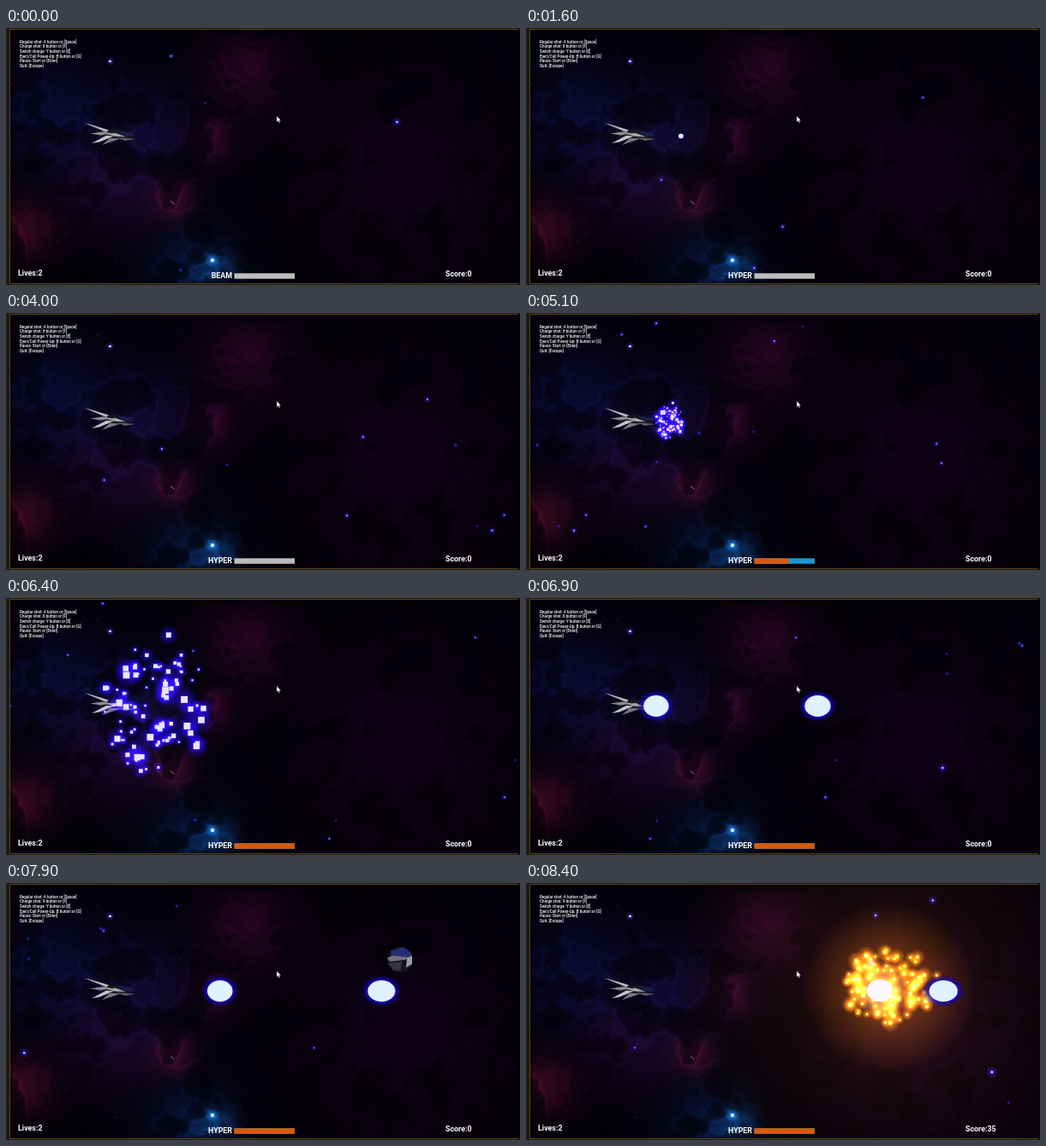
Write an HTML page with a canvas that moves like this. It is 600 by 301 pixels and loops after 8500 ms.

```html
<!DOCTYPE html>
<html lang="en">
<head>
<meta charset="utf-8">
<title>Space shooter</title>
<style>
html, body { margin: 0; width: 100%; height: 100%; overflow: hidden; background: #030108; }
#stage { position: relative; width: 600px; height: 301px; overflow: hidden; }
canvas, svg { position: absolute; left: 0; top: 0; width: 600px; height: 301px; display: block; }
text { fill: #fff; font-family: Roboto, Arial, sans-serif; }
.help { font-size: 4.53px; font-weight: 500; }
.hud { font-size: 8.85px; font-weight: 700; }
</style>
</head>
<body>
<div id="stage">
<canvas id="view" width="600" height="301"></canvas>
<svg viewBox="0 0 600 301">
  <g class="help">
    <text x="16" y="17.8">Regular shot: A button or [Space]</text>
    <text x="16" y="23.4">Charge shot: X button or [F]</text>
    <text x="16" y="29">Switch charge: Y button or [E]</text>
    <text x="16" y="34.6">Eject/Call Power-Up: B button or [G]</text>
    <text x="16" y="40.1">Pause: Start or [Enter]</text>
    <text x="16" y="45.6">Quit: [Escape]</text>
  </g>
  <g class="hud">
    <text x="14" y="290">Lives:2</text>
    <text id="mode" x="264" y="293" text-anchor="end">BEAM</text>
    <text id="score" x="513" y="291">Score:0</text>
  </g>
  <path d="M316 103v7.2l1.6-1.4 1.2 2.4 1.1-.5-1.1-2.3h2.2z" fill="#fff" stroke="#222" stroke-width=".4"/>
</svg>
</div>
<script>
const W = 600, H = 301, LOOP = 8500, STEP = 100, TAU = Math.PI * 2;
const ctx = document.getElementById('view').getContext('2d');
const modeText = document.getElementById('mode');
const scoreText = document.getElementById('score');

// Event times in seconds
const T = { hyper: 0.9, shot: 1.535, charge: 4.3, full: 5.7, fire: 6.499, enemy: 6.9, hit: 8.2 };
const SHOT_SPEED = 475, STAR_SPEED = 465;

const clamp = (v, lo = 0, hi = 1) => Math.max(lo, Math.min(hi, v));

function seeded(seed) {
  return () => {
    seed = (seed * 1664525 + 1013904223) >>> 0;
    return seed / 4294967296;
  };
}

function scatter(count, seed, make) {
  const rnd = seeded(seed);
  return Array.from({ length: count }, () => make(rnd));
}

// Random point in an ellipse, evenly spread
function inEllipse(rnd, rx, ry) {
  const a = rnd() * TAU, r = Math.sqrt(rnd());
  return { x: rx * r * Math.cos(a), y: ry * r * Math.sin(a) };
}

function glow(c, x, y, r, rgb, alpha) {
  const g = c.createRadialGradient(x, y, 0, x, y, r);
  g.addColorStop(0, `rgba(${rgb},${alpha})`);
  g.addColorStop(0.45, `rgba(${rgb},${alpha * 0.4})`);
  g.addColorStop(1, `rgba(${rgb},0)`);
  c.fillStyle = g;
  c.fillRect(x - r, y - r, r * 2, r * 2);
}

function oval(c, color, x, y, rx, ry = rx) {
  c.fillStyle = color;
  c.beginPath();
  c.ellipse(x, y, rx, ry, 0, 0, TAU);
  c.fill();
}

function square(color, x, y, side) {
  ctx.fillStyle = color;
  ctx.fillRect(x - side / 2, y - side / 2, side, side);
}

function shape(c, color, path) {
  c.fillStyle = color;
  c.fill(new Path2D(path));
}

// Nebula: soft colour clouds shaped by fractal noise
function hash(x, y) {
  const s = Math.sin(x * 127.1 + y * 311.7) * 43758.5453;
  return s - Math.floor(s);
}

function noise(x, y) {
  const ix = Math.floor(x), iy = Math.floor(y);
  let u = x - ix, v = y - iy;
  u *= u * (3 - 2 * u);
  v *= v * (3 - 2 * v);
  const a = hash(ix, iy), b = hash(ix + 1, iy);
  const c = hash(ix, iy + 1), d = hash(ix + 1, iy + 1);
  return a + (b - a) * u + (c - a) * v + (a - b - c + d) * u * v;
}

function fbm(x, y) {
  let sum = 0;
  for (let i = 0, amp = 0.52, f = 1 / 32; i < 5; i++, amp /= 2, f *= 2.03)
    sum += amp * noise(x * f + i * 17, y * f + i * 31);
  return sum;
}

const cloud = (x, y, r, ...rgb) => ({ x, y, r, rgb });
const clouds = [
  cloud(50, 100, 62, 12, 16, 66),
  cloud(160, 122, 62, 14, 13, 56),
  cloud(125, 185, 60, 30, 8, 40),
  cloud(20, 238, 34, 84, 15, 36),
  cloud(194, 200, 24, 84, 15, 42),
  cloud(238, 130, 26, 64, 9, 42),
  cloud(280, 50, 48, 50, 7, 34),
  cloud(460, 170, 135, 19, 2, 22),
  cloud(215, 285, 50, 6, 28, 68),
  cloud(243, 286, 24, 8, 58, 100)
];

function paintNebula(c) {
  const img = c.createImageData(W, H);
  for (let y = 0, i = 0; y < H; y++) {
    for (let x = 0; x < W; x++, i += 4) {
      const n = fbm(x, y);
      const wisp = (1 - Math.min(1, Math.abs(n - 0.5) * 8)) ** 2;
      const k = 0.18 + clamp((n - 0.27) * 2) * 0.5 + wisp * 0.4;
      const px = [2, 0, 7];
      for (const { x: cx, y: cy, r, rgb } of clouds) {
        const w = Math.exp(-((x - cx) ** 2 + (y - cy) ** 2) / (r * r)) * k;
        rgb.forEach((v, j) => { px[j] += v * w; });
      }
      img.data.set([...px, 255], i);
    }
  }
  c.putImageData(img, 0, 0);
}

function paintShip(c) {
  shape(c, '#17171d', 'M104 121L132 119 150 125 141 131 112 130Z');
  shape(c, '#b4b4b8', 'M92 111.5L97 112.5 120 119.5 117 122Z');
  shape(c, '#8d8d94', 'M98 123.5L114 121.5 124 123.5 110 125.5Z');
  shape(c, '#c4c4c8', 'M100 135L117 126 126 126.5 109 133.5Z');
  shape(c, '#77777f', 'M112 137L121 129 134 129.5Z');
  shape(c, '#62626a', 'M130 128.5L151 130 139 132Z');
  shape(c, '#171e4c', 'M130 120.5L147 122.5 151 126 137 126Z');
  shape(c, '#a5a5ac', 'M117 124L128 123 140 127.5 128 127Z');
}

function paintFrame(c) {
  c.fillStyle = '#1c1a15';
  c.fillRect(0, 0, 4, H);
  c.fillRect(0, 0, W, 1);
  c.fillRect(0, 300, W, 1);
  c.fillStyle = '#54431a';
  c.fillRect(4, 1, 594, 1);
  c.fillRect(4, 299, 594, 1);
  c.fillRect(4, 1, 1, 298);
}

function makeBackdrop() {
  const canvas = document.createElement('canvas');
  canvas.width = W;
  canvas.height = H;
  const c = canvas.getContext('2d');
  paintNebula(c);
  scatter(130, 12, rnd => {
    const s = 0.5 + rnd() * 0.6;
    c.fillStyle = `rgba(90,105,210,${0.15 + rnd() * 0.45})`;
    c.fillRect(5 + 310 * rnd() ** 1.4, 4 + rnd() * 294, s, s);
  });
  c.globalCompositeOperation = 'lighter';
  glow(c, 121.5, 39, 5, '80,70,230', 0.9);
  oval(c, '#b9b4ff', 121.5, 39, 1.6, 1.1);
  glow(c, 241, 272, 9, '40,130,220', 0.8);
  oval(c, '#b5e6fa', 241, 272, 2);
  c.globalCompositeOperation = 'source-over';
  c.strokeStyle = '#c97a9b';
  c.lineWidth = 0.9;
  c.stroke(new Path2D('M192 202.5L196.5 206.5'));
  return canvas;
}

const stars = scatter(58, 77, rnd => ({
  enter: -1.3 + rnd() * 9.8,
  y: 5 + rnd() * 291,
  size: 0.8 + 1.2 * rnd() + 1.6 * rnd() ** 12
}));

function drawStars(t) {
  for (const { enter, y, size } of stars) {
    const x = W - STAR_SPEED * (t - enter);
    if (x < 4 || x > 598) continue;
    glow(ctx, x, y, size * 2.3, '50,35,255', 0.95);
    square(size > 1.35 ? '#c5c0ff' : '#4b43c8', x, y, size * 0.85);
  }
}

const sparks = scatter(88, 5, rnd => ({ ...inEllipse(rnd, 60, 86), size: 2 + 6 * rnd() ** 1.3 }));

// The spark cloud swells as the shot charges
function drawCharge(t) {
  if (t < T.charge || t >= T.fire) return;
  const spread = ((t - T.charge) / 2.1) ** 1.4;
  const grow = 0.25 + 0.75 * spread;
  const placed = sparks.map(s => ({
    x: 165 + (9 + s.x) * spread,
    y: 127 + (s.y - 2) * spread,
    side: Math.max(1, s.size * grow)
  }));
  ctx.globalCompositeOperation = 'lighter';
  for (const { x, y, side } of placed) glow(ctx, x, y, side * 1.9 + 1, '35,8,255', 0.9);
  ctx.globalCompositeOperation = 'source-over';
  for (const { x, y, side } of placed) square('#ece4ff', x, y, side);
}

function drawBall(x, y, rx, ry) {
  const g = ctx.createRadialGradient(0, 0, 0.8, 0, 0, 1.45);
  g.addColorStop(0, 'rgba(40,20,255,1)');
  g.addColorStop(0.4, 'rgba(22,8,190,.7)');
  g.addColorStop(1, 'rgba(10,0,120,0)');
  ctx.save();
  ctx.translate(x, y);
  ctx.scale(rx, ry);
  oval(ctx, g, 0, 0, 1.45);
  ctx.restore();
  oval(ctx, '#e0f2ff', x, y, rx * 0.95, ry * 0.95);
}

function drawShots(t) {
  const shotX = 150 + SHOT_SPEED * (t - T.shot);
  if (t >= T.shot && shotX < 605) drawBall(shotX, 126.5, 3, 3);
  for (let i = 0; i < 4; i++) {
    const age = t - T.fire - i * 0.397;
    const x = 150 + SHOT_SPEED * age;
    if (age < 0 || x > 625) continue;
    drawBall(x, 126.5, 15.5 + 3.5 * clamp((x - 201) / 377) ** 2, 13.2);
  }
}

function drawEnemy(t) {
  if (t < T.enemy || t >= T.hit) return;
  const age = t - 7.4;
  ctx.save();
  ctx.translate(527 - 134 * age, 32 + 116 * age);
  oval(ctx, '#14141f', 0, 0, 15);
  shape(ctx, '#262c72', 'M-11-11L4-15 14-7 11-2-10-4Z');
  shape(ctx, '#707080', 'M-15-2L-9-5 10-3 6 0-12 2Z');
  shape(ctx, '#34343f', 'M-14 4L2 2 1 13-8 12Z');
  shape(ctx, '#9a9aa6', 'M8-2L14-5 14 5 7 9Z');
  ctx.restore();
}

const embers = scatter(100, 41, rnd => ({ ...inEllipse(rnd, 57, 43), size: 2 + rnd() * 3 }));

function drawBlast(t) {
  if (t < T.hit) return;
  const k = 0.4 + 3 * (t - T.hit);
  ctx.globalCompositeOperation = 'lighter';
  glow(ctx, 424, 123, 260 * k, '80,36,8', 0.5);
  glow(ctx, 424, 123, 100 * k, '190,100,8', 0.75);
  for (const { x: ex, y: ey, size } of embers) {
    const x = 413 + (ex + 13) * k, y = 126 + (ey - 5) * k;
    glow(ctx, x, y, size * 2.3, '255,150,20', 0.85);
    oval(ctx, '#ffc655', x, y, size * 0.5);
  }
  glow(ctx, 415, 126, 32, '255,225,160', 0.9);
  ctx.globalCompositeOperation = 'source-over';
  oval(ctx, '#fbf8ff', 413, 126, 15, 13);
}

function drawBar(t) {
  const fill = clamp((t - T.charge) / (T.full - T.charge));
  ctx.fillStyle = t < T.charge ? '#bdbdbd' : '#1c97d2';
  ctx.fillRect(266.5, 287.3, 70.5, 6.4);
  ctx.fillStyle = '#d9590b';
  ctx.fillRect(266.5, 287.3, 70.5 * fill, 6.4);
}

const backdrop = makeBackdrop();

function render(t) {
  ctx.drawImage(backdrop, 0, 0);
  drawStars(t);
  paintShip(ctx);
  drawCharge(t);
  drawEnemy(t);
  drawBlast(t);
  drawShots(t);
  paintFrame(ctx);
  drawBar(t);
  modeText.textContent = t < T.hyper ? 'BEAM' : 'HYPER';
  scoreText.textContent = t < T.hit ? 'Score:0' : 'Score:35';
}

const start = performance.now();
function tick() {
  const ms = (performance.now() - start) % LOOP;
  render(Math.floor(ms / STEP) * STEP / 1000);
  requestAnimationFrame(tick);
}
tick();
</script>
</body>
</html>
```
